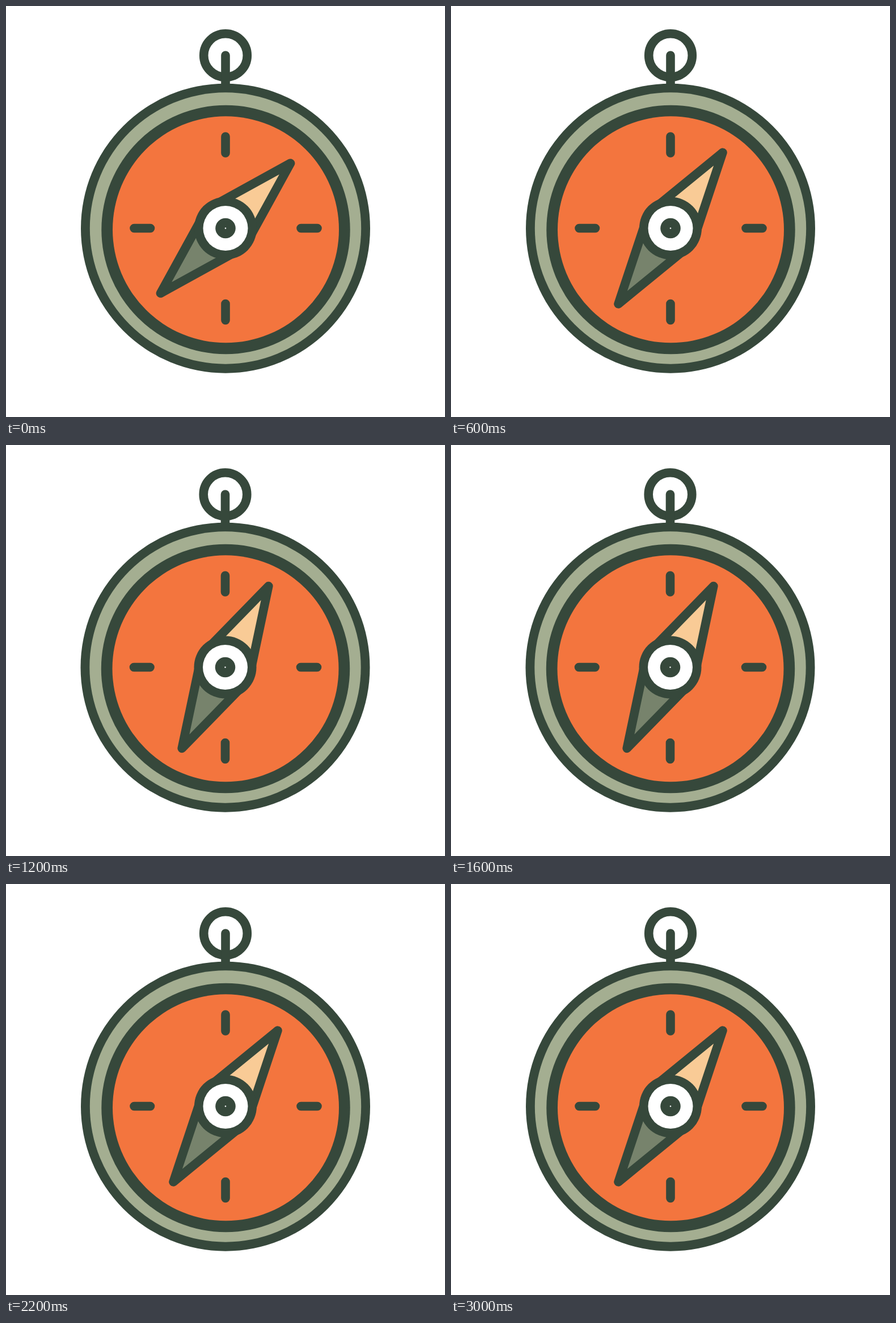
Animation of 774x724 px, one loop 3.2 s. Source, as an HTML page:

```html
<!DOCTYPE html>
<html lang="en">
<head>
<meta charset="utf-8">
<title>Compass</title>
<style>
  html, body { margin: 0; width: 100%; height: 100%; overflow: hidden; background: #fff; }
  svg { display: block; width: 774px; height: 724px; }
  .line { fill: none; stroke: #36483b; stroke-width: 15.6; stroke-linecap: round; stroke-linejoin: round; }
  .dark { fill: #36483b; }
</style>
</head>
<body>
<svg viewBox="0 0 774 724">
  <g id="compass">
    <circle class="line" cx="387" cy="87" r="38.3"/>
    <path class="line" d="M387 87V145"/>
    <circle class="dark" cx="387" cy="391.7" r="255"/>
    <circle cx="387" cy="391.5" r="239.2" fill="#a4ae91"/>
    <circle class="dark" cx="387.5" cy="394" r="219.2"/>
    <circle cx="387.5" cy="393.8" r="199.5" fill="#f3753e"/>
    <path class="line" d="M387 230V259M387 524.5V553.5M226 391.5H254.5M520 391.5H549"/>
    <g transform="translate(387 391.5)">
      <g id="needle">
        <path d="M-47 0L0-162 47 0Z" fill="#f9cb96"/>
        <path d="M-47 0L0 162 47 0Z" fill="#77836c"/>
        <path class="line" d="M-47 0L0-162 47 0 0 162Z"/>
      </g>
      <circle class="dark" r="55"/>
      <circle r="39.5" fill="#fff"/>
      <circle class="dark" r="17.8"/>
      <circle r="1.2" fill="#fff"/>
    </g>
  </g>
</svg>
<script>
  const compass = document.getElementById('compass');
  const needle = document.getElementById('needle');
  const STEP = 200, STEPS = 16;

  // One wide swing opens the loop, then the needle trembles between two poses.
  function draw(time) {
    const step = Math.floor(time / STEP) % STEPS;
    const low = step > 0 && step % 2 === 0;
    const angle = step === 0 ? 45 : low ? 28.1 : 34.6;
    needle.setAttribute('transform', `rotate(${angle})`);
    compass.setAttribute('transform', `translate(${low ? -0.5 : 0} 0)`);
  }

  const start = performance.now();
  function tick() {
    draw(performance.now() - start);
    requestAnimationFrame(tick);
  }
  tick();
</script>
</body>
</html>
```
